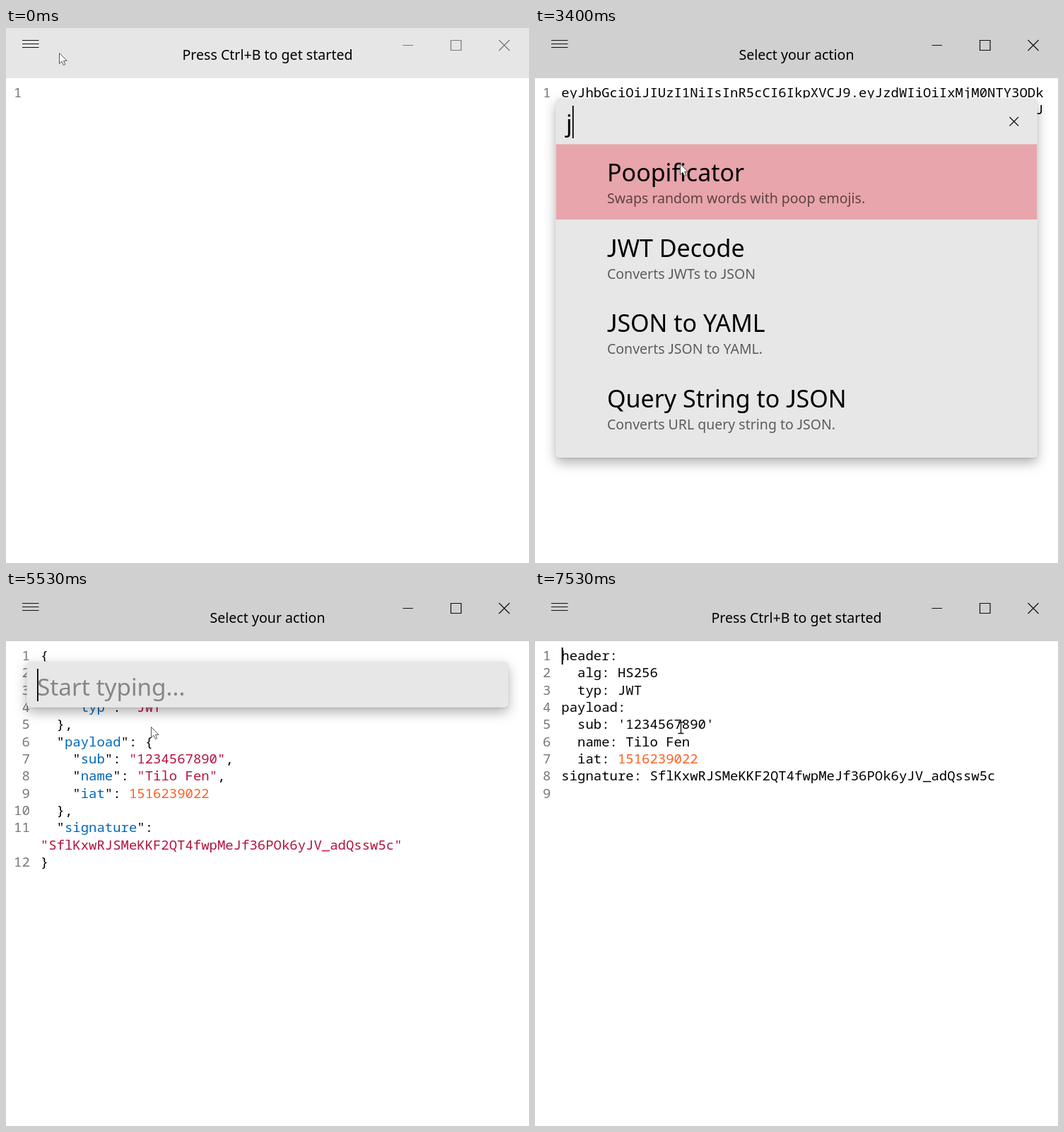
Recreate the animation shown at these times as an HTML page. Size 740 px wide and 757 px high, loop 8000 ms.

```html
<!DOCTYPE html>
<html lang="en">
<head>
<meta charset="utf-8">
<title>Token decoding in a text editor</title>
<style>
html, body { margin: 0; width: 100%; height: 100%; overflow: hidden; background: #fff; }
svg { display: block; width: 740px; height: 757px; }
text { white-space: pre; font-family: "Noto Sans", "Open Sans", sans-serif; }
.code { font: 18.97px "Noto Sans Mono", monospace; }
.num { fill: #777; text-anchor: end; }
.title { font-size: 19.6px; text-anchor: middle; }
.query { font-size: 33.3px; }
.name { font-size: 34px; }
.info { font-size: 19.5px; fill-opacity: .6; }
.j { font-family: Lato, sans-serif; }
.key { fill: #0067b8; }
.str { fill: #b3123e; }
.lit { fill: #ff5f22; }
.thin { fill: none; stroke: #111; stroke-width: 1.2; }
.icon { fill: none; stroke: #4a4a4a; stroke-width: 3.2; }
.www { font-size: 12.5px; font-weight: 800; fill: #4a4a4a; stroke: none; text-anchor: middle; }
</style>
</head>
<body>
<svg viewBox="0 0 740 757" xml:space="preserve">
  <defs>
    <filter id="shadow" x="-10%" y="-40%" width="120%" height="220%">
      <feDropShadow dx="0" dy="7" stdDeviation="9" flood-opacity=".27"/>
      <feDropShadow dx="0" dy="1" stdDeviation="1.2" flood-opacity=".16"/>
    </filter>
  </defs>
  <rect width="740" height="757" fill="#fff"/>
  <rect id="bar" width="740" height="71"/>
  <path class="thin" d="M23 17.5H46.5M23 22.5H46.5M23 27.5H46.5"/>
  <path id="buttons" class="thin" d="M561.5 24.5H576M629.5 17.5h14.5v14h-14.5zM697.5 17l15 15m0-15l-15 15"/>
  <g id="scene"></g>
  <g id="pointer">
    <path id="arrow" d="M.5 .5V15.5L4 12.2 6.4 17.4 8.7 16.4 6.5 11.3H11.2Z" fill="#fff" stroke="#444" stroke-width=".9"/>
    <path id="beam" class="thin" d="M-2.5 -6.5H5.5M1.5 -6.5V9.5M-2.5 9.5H5.5" style="stroke-width:1.4"/>
  </g>
</svg>
<script>
const LOOP = 8000, FRAME = 1000 / 15, ROW = 106.5, LINE = 24.33;
const $ = id => document.getElementById(id);

const signature = 'SflKxwRJSMeKKF2QT4fwpMeJf36POk6yJV_adQssw5c';
const person = 'Tilo Fen';

// A row starting with "~" continues the line above and gets no number.
const docs = {
  empty: [''],
  token: [
    'eyJhbGciOiJIUzI1NiIsInR5cCI6IkpXVCJ9.eyJzdWIiOiIxMjM0NTY3ODk',
    '~wIiwibmFtZSI6IlRpbG8gRmVuIiwiaWF0IjoxNTE2MjM5MDIyfQ.' + signature.slice(0, 8),
    '~' + signature.slice(8)
  ],
  json: [
    '{', '  "header": {', '    "alg": "HS256",', '    "typ": "JWT"', '  },',
    '  "payload": {', '    "sub": "1234567890",', `    "name": "${person}",`,
    '    "iat": 1516239022', '  },', '  "signature":', `~"${signature}"`, '}'
  ],
  yaml: [
    'header:', '  alg: HS256', '  typ: JWT', 'payload:', "  sub: '1234567890'",
    `  name: ${person}`, '  iat: 1516239022', `signature: ${signature}`, ''
  ]
};

// Icons are drawn around the centre of their row.
const icons = {
  code: '<path d="M-10-13-20 0-10 13M4.5-17-4 17M11-13 21 0 11 13"/>',
  card: '<rect x="-19" y="-13.5" width="38" height="28" rx="3"/><circle cx="-7" cy="-4" r="2.8"/>' +
        '<path d="M-13 8q0-5.5 6-5.5t6 5.5M4-4H14M4 4H14"/>',
  shapes: '<path d="M-16-16h10v10h-10z"/><path d="M-6.5-7.5 2-7.5 5 0 0 6-8 4-10-2z" fill="#e7e7e7"/>' +
          '<circle cx="7.5" cy="8" r="9" fill="#e7e7e7"/>',
  globe: '<path d="M-15-7A16.5 16.5 0 0 1 15-7M-15 8A16.5 16.5 0 0 0 15 8M-14-8.5H14M-14 9.5H14' +
         'M-6-8Q-4-16 0-16T6-8M-6 9Q-4 17 0 17T6 9" stroke-width="2.6"/><text class="www" y="5">WWW</text>'
};

const actions = {
  poop: ['Poopificator', 'Swaps random words with poop emojis.', 'code'],
  jwt: ['JWT Decode', 'Converts JWTs to JSON', 'card'],
  yaml: ['JSON to YAML', 'Converts JSON to YAML.', 'shapes'],
  query: ['Query String to JSON', 'Converts URL query string to JSON.', 'globe'],
  format: ['Format JSON', 'Cleans and formats JSON documents.', 'code']
};
const forJ = ['poop', 'jwt', 'yaml', 'query'];
const forJson = ['yaml', 'jwt', 'query', 'format'];

const steps = [
  { at: 0, doc: 'empty' },
  { at: 1130, doc: 'empty', caret: [0, 0] },
  { at: 1870, doc: 'token', caret: [35, 2] },
  { at: 2930, doc: 'token', query: '' },
  { at: 3400, doc: 'token', query: 'j', items: forJ },
  { at: 3470, doc: 'token', query: 'j', items: forJ, icons: true },
  { at: 3530, doc: 'token', query: 'jw', items: ['jwt'] },
  { at: 3600, doc: 'token', query: 'jwt', items: ['jwt'], icons: true },
  { at: 4000, doc: 'token', query: 'jwt', items: ['jwt'], icons: true, pressed: true },
  { at: 4470, doc: 'json', caret: [0, 0] },
  { at: 5270, doc: 'json', query: '' },
  { at: 6270, doc: 'json', query: 'j', items: forJ, icons: true },
  { at: 6400, doc: 'json', query: 'js', items: forJson },
  { at: 6470, doc: 'json', query: 'js', items: forJson, icons: true },
  { at: 6530, doc: 'json', query: 'jso', items: forJson, icons: true },
  { at: 6600, doc: 'json', query: 'json', items: forJson, icons: true },
  { at: 7070, doc: 'json', query: 'json', items: forJson, icons: true, pressed: true },
  { at: 7400, doc: 'yaml', caret: [0, 0] }
];

const track = [
  [0, 75, 35], [400, 384, 398], [800, 203, 197], [1000, 203, 197],
  [1270, 191.5, 168.5], [2129, 191.5, 168.5], [2130, 205, 192], [LOOP, 205, 192]
];

const span = (cls, s) => `<tspan class="${cls}">${s}</tspan>`;
const text = (cls, x, y, s) => `<text class="${cls}" x="${x}" y="${y}">${s}</text>`;
const ui = (cls, x, y, s) => text(cls, x, y, s.replace(/J/g, span('j', 'J')));
const rect = (x, y, w, h, fill, more = '') =>
  `<rect x="${x}" y="${y}" width="${w}" height="${h}" fill="${fill}" ${more}/>`;

const highlight = s => s.replace(/"(\w+)"(?=:)|"[^"]*"|\b\d+$/g, (m, key) =>
  key ? `"${span('key', key)}"` : span(m[0] === '"' ? 'str' : 'lit', m));

function editor({ doc, caret }) {
  const wide = doc === 'json' ? 11.5 : 0;
  let n = 0, out = '';
  docs[doc].forEach((row, i) => {
    const y = 98 + i * LINE;
    if (row[0] !== '~') out += text('code num', 22.3 + wide, y, ++n);
    out += text('code', 37.3 + wide, y, highlight(row.replace('~', '')));
  });
  if (caret) out += rect(37.7 + wide + caret[0] * 11.38, 80 + caret[1] * LINE, 2, 24, '#000');
  return out;
}

function palette({ query, items = [], icons: shown, pressed }) {
  const bottom = items.length > 1 ? 608 : 164.5 + ROW * items.length;
  const box = (fill, more) => rect(29.5, 99.5, 681, bottom - 99.5, fill, 'rx="5" ' + (more || ''));
  let out = box('#e7e7e7', 'filter="url(#shadow)"') + `<clipPath id="frame">${box('#000')}</clipPath>`;
  if (items.length)
    out += rect(29.5, 164.5, 681, ROW, pressed ? '#e4979e' : '#e8a5ab', 'clip-path="url(#frame)"');
  items.forEach((id, i) => {
    const [name, info, icon] = actions[id], y = 164.5 + i * ROW;
    if (shown) out += `<g class="icon" transform="translate(71 ${y + 51.2})">${icons[icon]}</g>`;
    out += ui('name', 102, y + 52.7, name) + ui('info', 102, y + 83.5, info);
  });
  if (query) out += '<path class="thin" d="M671.5 126l12.5 12.5m0-12.5l-12.5 12.5"/>';
  out += query ? `<text id="query" class="query" x="44" y="147">${query}</text>`
               : '<text class="query" x="44" y="148" fill="#868686">Start typing...</text>';
  return out + rect(44, 110, 1.8, 46, '#000', 'id="caret"');
}

function draw(step) {
  const open = step.query !== undefined;
  $('scene').innerHTML =
    text('title', 370, 45, open ? 'Select your action' : 'Press Ctrl+B to get started') +
    editor(step) + (open ? palette(step) : '');
  if (step.query) $('caret').setAttribute('x', 44.3 + $('query').getComputedTextLength());
}

const clamp = k => Math.max(0, Math.min(1, k));
const mix = (a, b, k) => a + (b - a) * k;
const grey = v => `rgb(${v},${v},${v})`;

function place(t) {
  const i = track.findIndex(p => p[0] > t), a = track[i - 1], b = track[i];
  const u = (t - a[0]) / (b[0] - a[0]), k = u * u * (3 - 2 * u);
  return [mix(a[1], b[1], k), mix(a[2], b[2], k)];
}

let current;
const start = performance.now();

function render() {
  const t = (performance.now() - start) % LOOP;
  const step = steps.findLast(s => s.at <= t);
  if (step !== current) draw(current = step);

  const tick = Math.min(LOOP - 1, Math.floor((t + 4) / FRAME) * FRAME);
  const active = clamp((tick - 1000) / 260);
  $('bar').style.fill = grey(t < 2930 ? Math.round(mix(230, 214, active)) : 208);
  $('buttons').style.stroke = grey(Math.round(mix(120, 17, active)));

  const [x, y] = place(tick);
  const arrow = y < 71 || (t >= 3000 && t < 4530) || (t >= 5530 && t < 7530);
  $('pointer').setAttribute('transform', `translate(${x} ${y})`);
  $('arrow').style.display = arrow ? '' : 'none';
  $('beam').style.display = arrow ? 'none' : '';
  requestAnimationFrame(render);
}
render();
</script>
</body>
</html>
```
